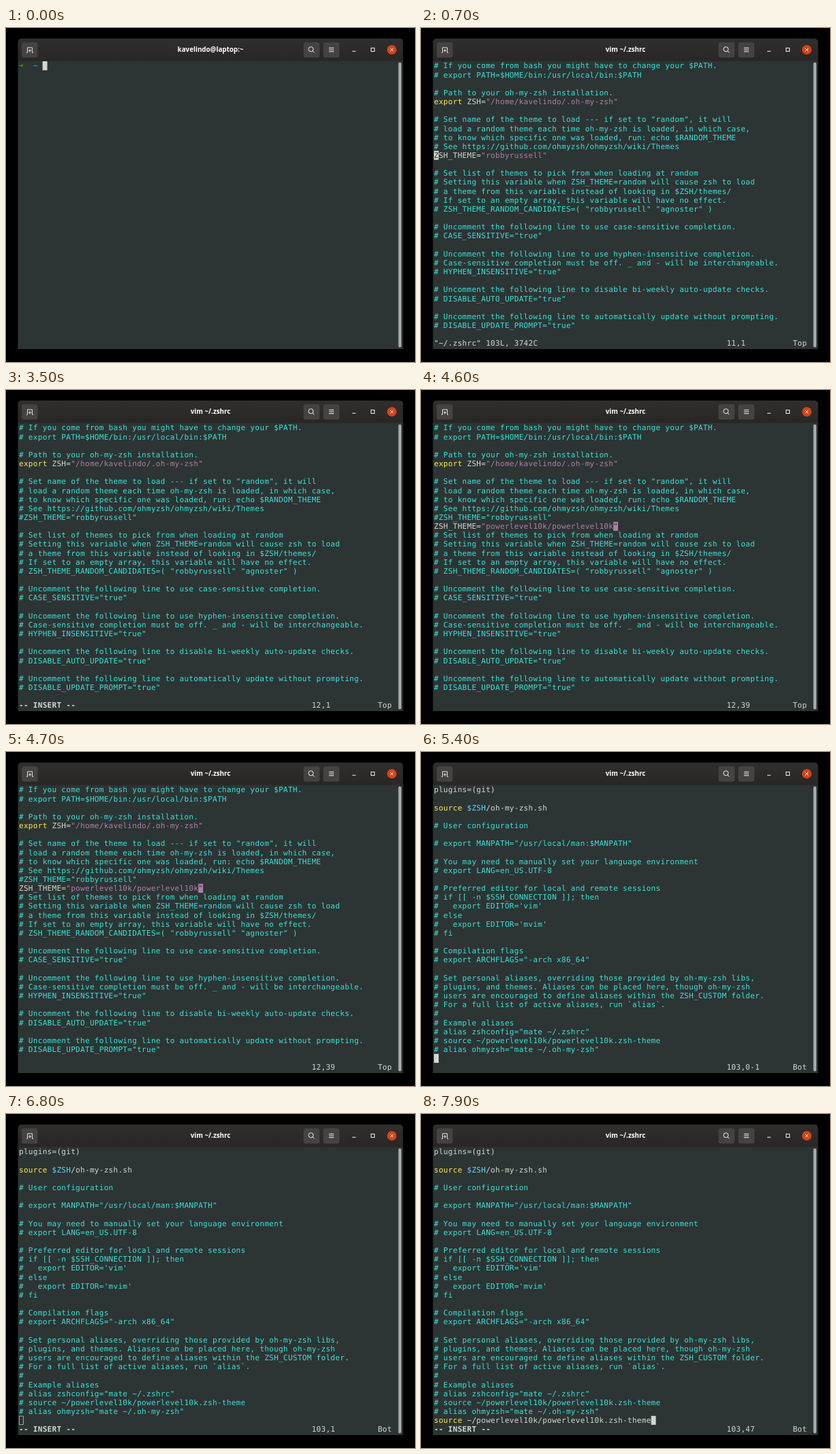
Write an HTML page that moves like this. It is 600x491 px and loops after 8000 ms.

```html
<!DOCTYPE html>
<html lang="en">
<head>
<meta charset="utf-8">
<title>Terminal</title>
<style>
html, body { margin: 0; width: 100%; height: 100%; overflow: hidden; background: #000; }
svg { position: absolute; left: 0; top: 0; }
#title { font: 700 9.8px "Open Sans", "Noto Sans", sans-serif; fill: #fff; text-anchor: middle; }
/* 80x32 cells of 10x19, scaled to the stage */
#term {
  position: absolute; left: 18.5px; top: 49.1px; width: 800px; height: 608px;
  transform: scale(.6926); transform-origin: 0 0;
  font: 16px/19px "DejaVu Sans Mono", monospace; color: #d3d7cf;
  text-rendering: geometricPrecision; white-space: pre; font-variant-ligatures: none;
}
#term i { font-style: normal; }
#text, #cursor { position: absolute; left: 0; top: 0; }
#cursor { width: 10px; height: 19px; box-sizing: border-box; color: #2d3434; }
.comment { color: #38e2d6; }
.word { color: #fce94f; }
.string { color: #ad7fa8; }
.var { color: #5fd7ff; }
.arrow { display: inline-block; width: 10px; letter-spacing: 0; color: #4e9a06; }
.dir { color: #1aa09a; }
</style>
</head>
<body>
<svg width="600" height="491" fill="none">
  <defs>
    <linearGradient id="bar" x2="0" y2="1">
      <stop stop-color="#302f2e"/><stop offset="1" stop-color="#282726"/>
    </linearGradient>
  </defs>
  <path d="M17.5 48H582.5V472H17.5Z" fill="#2d3434"/>
  <path d="M17.5 48.5V20.5a5 5 0 0 1 5-5H577.5a5 5 0 0 1 5 5V48.5Z" fill="url(#bar)"/>
  <g fill="#444341">
    <rect x="23" y="21" width="23.5" height="22.5" rx="3"/>
    <rect x="436.5" y="21" width="23.5" height="22.5" rx="3"/>
    <rect x="465.5" y="21" width="23.5" height="22.5" rx="3"/>
  </g>
  <circle cx="566" cy="32" r="7" fill="#d5431a"/>
  <g stroke="#f2f2f0">
    <path d="M29.8 36.2H31.5V28.8H38.5V36.2H40.2M35 31V35.4M32.8 33.2H37.2" stroke-width=".9"/>
    <circle cx="447.3" cy="31.2" r="3.5"/>
    <path d="M449.8 33.7L452.4 36.3M473.8 29.3H481M473.8 32H481M473.8 34.7H481"/>
    <path d="M508 34.2H513.2"/>
    <rect x="535.6" y="29.4" width="5" height="5"/>
    <path d="M563.8 29.8L568.2 34.2M568.2 29.8L563.8 34.2"/>
  </g>
  <rect x="575.6" y="50.5" width="4.4" height="419" rx="2.2" fill="#a6aaa6"/>
  <text id="title" x="300" y="35.4"></text>
</svg>
<div id="term"><div id="text"></div><div id="cursor"></div></div>

<script>
const LOOP = 8000, BLINK = 600, COMMAND = 'vim ~/.zshrc';
const $ = id => document.getElementById(id);
const term = $('term'), text = $('text'), cursor = $('cursor'), title = $('title');

const head = `# If you come from bash you might have to change your $PATH.
# export PATH=$HOME/bin:/usr/local/bin:$PATH

# Path to your oh-my-zsh installation.
export ZSH="/home/kavelindo/.oh-my-zsh"

# Set name of the theme to load --- if set to "random", it will
# load a random theme each time oh-my-zsh is loaded, in which case,
# to know which specific one was loaded, run: echo $RANDOM_THEME
# See https://github.com/ohmyzsh/ohmyzsh/wiki/Themes
ZSH_THEME="robbyrussell"

# Set list of themes to pick from when loading at random
# Setting this variable when ZSH_THEME=random will cause zsh to load
# a theme from this variable instead of looking in $ZSH/themes/
# If set to an empty array, this variable will have no effect.
# ZSH_THEME_RANDOM_CANDIDATES=( "robbyrussell" "agnoster" )

# Uncomment the following line to use case-sensitive completion.
# CASE_SENSITIVE="true"

# Uncomment the following line to use hyphen-insensitive completion.
# Case-sensitive completion must be off. _ and - will be interchangeable.
# HYPHEN_INSENSITIVE="true"

# Uncomment the following line to disable bi-weekly auto-update checks.
# DISABLE_AUTO_UPDATE="true"

# Uncomment the following line to automatically update without prompting.
# DISABLE_UPDATE_PROMPT="true"
`.split('\n');

const tail = `plugins=(git)

source $ZSH/oh-my-zsh.sh

# User configuration

# export MANPATH="/usr/local/man:$MANPATH"

# You may need to manually set your language environment
# export LANG=en_US.UTF-8

# Preferred editor for local and remote sessions
# if [[ -n $SSH_CONNECTION ]]; then
#   export EDITOR='vim'
# else
#   export EDITOR='mvim'
# fi

# Compilation flags
# export ARCHFLAGS="-arch x86_64"

# Set personal aliases, overriding those provided by oh-my-zsh libs,
# plugins, and themes. Aliases can be placed here, though oh-my-zsh
# users are encouraged to define aliases within the ZSH_CUSTOM folder.
# For a full list of active aliases, run \`alias\`.
#
# Example aliases
# alias zshconfig="mate ~/.zshrc"
# source ~/powerlevel10k/powerlevel10k.zsh-theme
# alias ohmyzsh="mate ~/.oh-my-zsh"
`.split('\n');

const put = (lines, row, line) => lines.map((old, i) => i === row ? line : old);
const hashed = put(head, 10, '#' + head[10]);
const themed = put(hashed, 11, 'ZSH_THEME="powerlevel10k/powerlevel10k"');
const sourced = put(tail, 30, 'source ~/powerlevel10k/powerlevel10k.zsh-theme');
const INSERT = '-- INSERT --';

// Editor steps: start, lines, status, ruler, cursor row and column
const steps = [
  [700, head, '"~/.zshrc" 103L, 3742C', '11,1', 10, 0],
  [1600, head, INSERT, '11,1', 10, 0],
  [2600, hashed, INSERT, '11,2', 10, 1],
  [2900, hashed, INSERT, '12,1', 11, 0],
  [3600, themed, INSERT, '12,40', 11, 39],
  [4300, themed, '', '12,39', 11, 38],
  [4900, tail, '', '103,0-1', 30, 0],
  [6100, tail, INSERT, '103,1', 30, 0],
  [7400, sourced, INSERT, '103,47', 30, 46]
];
const unfocused = t => t >= 6600 && t < 7400;

const tag = (name, s) => `<i class=${name}>${s}</i>`;
const paint = line => line[0] === '#' ? tag('comment', line) : line
  .replace(/"[^"]*"/g, s => tag('string', s))
  .replace(/^(export|source)\b/, s => tag('word', s))
  .replace('$ZSH', s => tag('var', s));

function moveCursor(row, col, char, kind, on, hollow) {
  cursor.style.transform = `translate(${col * 10}px, ${row * 19}px)`;
  cursor.style.visibility = on || hollow ? 'visible' : 'hidden';
  const color = { comment: '#38e2d6', string: '#ad7fa8' }[kind] || '#d3d7cf';
  cursor.style.background = hollow ? 'none' : color;
  cursor.style.border = hollow ? '1.5px solid ' + color : 'none';
  cursor.textContent = hollow ? '' : char;
}

let shown;
function show(html) {
  if (html !== shown) text.innerHTML = shown = html;
}

function drawShell(t) {
  const typed = COMMAND.slice(0, Math.ceil(Math.floor(t / 100) * COMMAND.length / 5));
  title.textContent = 'kavelindo@laptop:~';
  show(`<b>${tag('arrow', '➜')}  ${tag('dir', '~')}</b> ${typed}`);
  moveCursor(0, 5 + typed.length, '', '', true, false);
}

function drawEditor(t) {
  const [start, lines, status, ruler, row, col] = steps.filter(s => s[0] <= t).pop();
  const left = status.padEnd(62).replace(INSERT, `<b>${INSERT}</b>`);
  const place = lines === tail || lines === sourced ? 'Bot' : 'Top';
  title.textContent = COMMAND;
  show([...lines.map(paint), left + ruler.padEnd(14) + place].join('\n'));

  const line = lines[row], char = line[col] || '';
  const kind = char && line[0] === '#' ? 'comment' : char === '"' ? 'string' : '';
  const on = Math.floor((t - start) / BLINK) % 2 === 0;
  moveCursor(row, col, char, kind, on, unfocused(t));
}

// Spread the glyphs onto the 10px cell grid
text.textContent = 'm'.repeat(80);
term.style.letterSpacing = 10 - parseFloat(getComputedStyle(text).width) / 80 + 'px';

const begin = performance.now();
function frame() {
  const t = (performance.now() - begin) % LOOP;
  t < 700 ? drawShell(t) : drawEditor(t);
  requestAnimationFrame(frame);
}
frame();
</script>
</body>
</html>
```
